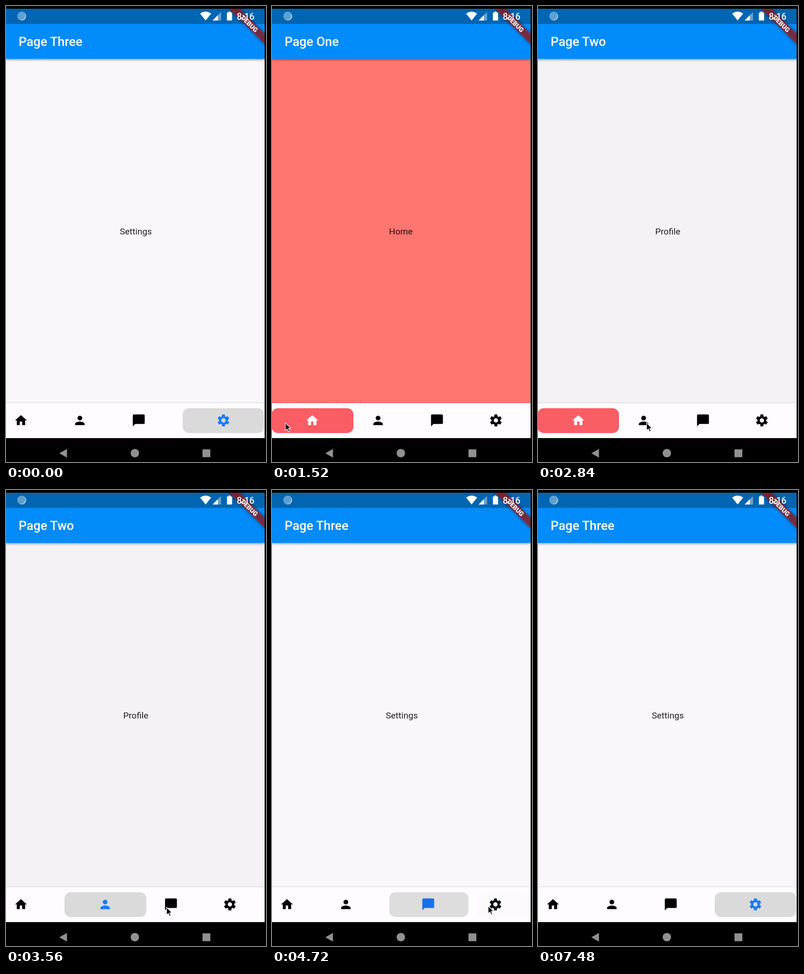
Recreate the animation shown at these times as an HTML page. Size 565x992 px, loop 7520 ms.

```html
<!DOCTYPE html>
<html lang="en">
<head>
<meta charset="utf-8">
<title>Bottom navigation</title>
<style>
  @property --p { syntax: '<number>'; inherits: true; initial-value: 0; }

  html, body { margin: 0; width: 100%; height: 100%; overflow: hidden; background: #000; }
  .stage { position: relative; width: 565px; height: 992px; overflow: hidden; background: #000;
    font-family: Roboto, sans-serif; }
  .layer { position: absolute; inset: 0; width: 565px; height: 992px; }
  .screen { position: absolute; left: 0; top: 6px; width: 562px; height: 934px; overflow: hidden; }

  /* pages */
  .page { position: absolute; inset: 0; background: var(--bg); visibility: hidden;
    animation: 7520ms step-end infinite; }
  .page svg { position: absolute; inset: 0; width: 562px; height: 934px; }
  .appbar { position: absolute; left: 0; top: 33px; width: 562px; height: 76px;
    background: #028bfa; box-shadow: 0 2px 5px rgba(0, 0, 0, .42); }
  .status { position: absolute; left: 0; top: 0; width: 562px; height: 33px; background: #0265b1; }
  .title { font-size: 27.3px; font-weight: 500; fill: #fff; }
  .label { font-size: 19.1px; fill: #000; fill-opacity: .87; text-anchor: middle; }
  .home { --bg: #ff7570; animation-name: show-home; }
  .profile { --bg: #f4f2f5; animation-name: show-profile; }
  .message { --bg: #929093; animation-name: show-message; }
  .settings { --bg: #f9f7fa; animation-name: show-settings; }

  @keyframes show-home {
    0%, 37.23%, 100% { visibility: hidden; }
    11.7% { visibility: visible; }
  }
  @keyframes show-profile {
    0%, 48.94%, 100% { visibility: hidden; }
    37.23% { visibility: visible; }
  }
  @keyframes show-message {
    0%, 60.11%, 100% { visibility: hidden; }
    48.94% { visibility: visible; }
  }
  @keyframes show-settings {
    0%, 60.11%, 100% { visibility: visible; }
    11.7% { visibility: hidden; }
  }

  /* tabs: --p runs from 0 (idle) to 1 (selected) */
  .tabs { position: absolute; left: 0; top: 858px; width: 562px; height: 76px;
    background: #fefcfe; box-shadow: 0 -1px 3px rgba(0, 0, 0, .13); }
  .row { position: absolute; left: -1px; top: 11px; display: flex; gap: 20px; }
  .tab { --r: 26; --g: 123; --b: 255; --pill: #dadada; position: relative; flex: none; height: 54px;
    width: calc(108.2px + 69.3px * var(--p));
    color: rgb(calc(var(--r) * var(--p)), calc(var(--g) * var(--p)), calc(var(--b) * var(--p)));
    animation: 7520ms cubic-bezier(.55, .055, .675, .19) infinite; }
  .tab::before { content: ''; position: absolute; inset: 0; border-radius: 14px;
    background: var(--pill); opacity: var(--p); }
  .tab svg { position: absolute; width: 31px; height: 31px; fill: currentColor;
    left: calc(18.1px + 55.15px * var(--p)); top: calc(11.4px - .8px * var(--p)); }
  .t-home { --r: 255; --g: 255; --b: 255; --pill: #fa5d64; animation-name: pick-home; }
  .t-profile { animation-name: pick-profile; }
  .t-message { animation-name: pick-message; }
  .t-settings { animation-name: pick-settings; }

  @keyframes pick-home {
    0%, 11.7%, 43.88%, 100% { --p: 0; }
    18.35%, 37.23% { --p: 1; }
  }
  @keyframes pick-profile {
    0%, 37.23%, 55.59%, 100% { --p: 0; }
    43.88%, 48.94% { --p: 1; }
  }
  @keyframes pick-message {
    0%, 48.94%, 66.76%, 100% { --p: 0; }
    55.59%, 60.11% { --p: 1; }
  }
  @keyframes pick-settings {
    0%, 11.7%, 66.76%, 100% { --p: 1; }
    18.35%, 60.11% { --p: 0; }
  }

  /* pointer */
  .cursor { animation: move 7520ms ease-in-out infinite; }
  @keyframes move {
    0%, 4.5% { transform: translate(120px, 996px); }
    7% { transform: translate(52px, 930px); }
    9.3% { transform: translate(16px, 910px); }
    11%, 24% { transform: translate(29px, 907px); }
    34.5%, 38% { transform: translate(236px, 907px); }
    46%, 49.4% { transform: translate(349px, 908px); }
    57%, 62% { transform: translate(474px, 904px); animation-timing-function: ease-in; }
    69% { transform: translate(270px, 943px); animation-timing-function: ease-out; }
    75%, 77% { transform: translate(37px, 911px); }
    80%, 100% { transform: translate(90px, 996px); }
  }
</style>
</head>
<body>
<div class="stage">
  <svg width="0" height="0" style="position:absolute">
    <symbol id="i-home" viewBox="0 0 24 24"><path d="M10 20v-6h4v6h5v-8h3L12 3 2 12h3v8z"/></symbol>
    <symbol id="i-person" viewBox="0 0 24 24">
      <circle cx="12" cy="8" r="4"/>
      <path d="M12 14c-2.67 0-8 1.34-8 4v2h16v-2c0-2.66-5.33-4-8-4z"/>
    </symbol>
    <symbol id="i-chat" viewBox="0 0 24 24">
      <path d="M20 2H4a2 2 0 0 0-2 2v18l4-4h14a2 2 0 0 0 2-2V4a2 2 0 0 0-2-2z"/>
    </symbol>
    <symbol id="i-gear" viewBox="0 0 24 24">
      <circle cx="12" cy="12" r="5.5" fill="none" stroke="currentColor" stroke-width="3.8"/>
      <path id="tooth" d="M9.2 6.2L9.6 2.4Q9.7 2 10.1 2H13.9Q14.3 2 14.4 2.4L14.8 6.2z"/>
      <use href="#tooth" transform="rotate(60 12 12)"/>
      <use href="#tooth" transform="rotate(120 12 12)"/>
      <use href="#tooth" transform="rotate(180 12 12)"/>
      <use href="#tooth" transform="rotate(240 12 12)"/>
      <use href="#tooth" transform="rotate(300 12 12)"/>
    </symbol>
  </svg>

  <div class="screen">
    <div class="page home"><div class="appbar"></div>
      <svg><text class="title" x="27.5" y="81">Page One</text><text class="label" x="280" y="490.5">Home</text></svg></div>
    <div class="page profile"><div class="appbar"></div>
      <svg><text class="title" x="27.5" y="81">Page Two</text><text class="label" x="282" y="490.5">Profile</text></svg></div>
    <div class="page message"><div class="appbar"></div>
      <svg><text class="title" x="27.5" y="81">Page Three</text><text class="label" x="282" y="490.5">Message</text></svg></div>
    <div class="page settings"><div class="appbar"></div>
      <svg><text class="title" x="27.5" y="81">Page Three</text><text class="label" x="282" y="490.5">Settings</text></svg></div>
    <div class="status"></div>

    <div class="tabs"><div class="row">
      <div class="tab t-home"><svg><use href="#i-home"/></svg></div>
      <div class="tab t-profile"><svg><use href="#i-person"/></svg></div>
      <div class="tab t-message"><svg><use href="#i-chat"/></svg></div>
      <div class="tab t-settings"><svg><use href="#i-gear"/></svg></div>
    </div></div>
  </div>

  <svg class="layer" viewBox="0 0 565 992">
    <clipPath id="clip"><path d="M0 6H562V940H0z"/></clipPath>
    <filter id="soft" x="-20%" y="-60%" width="140%" height="220%"><feGaussianBlur stdDeviation="3.5"/></filter>

    <!-- corner ribbon -->
    <g clip-path="url(#clip)">
      <g transform="translate(562 6) rotate(45)">
        <rect x="-54.6" y="38.2" width="109.2" height="16.4" opacity=".5" filter="url(#soft)"/>
        <rect x="-54.6" y="38.2" width="109.2" height="16.4" fill="#b71c1c" fill-opacity=".63"/>
        <text x="0" y="51.4" font-size="13.9" font-weight="900" fill="#fff" text-anchor="middle">DEBUG</text>
      </g>
    </g>

    <!-- status icons -->
    <circle cx="34.3" cy="22" r="8.4" fill="#5f9fce"/>
    <circle cx="34.3" cy="22" r="8.8" fill="none" stroke="#a9cfe9" stroke-width="1.6" stroke-dasharray="1.4 1.1"/>
    <path d="M41 16.2A9 9 0 0 1 31 30.4A9.6 9.6 0 0 0 41 16.2z" fill="#e4f1fa"/>
    <g fill="#fff">
      <path d="M433.8 31.6L421.8 16.6Q433.8 8 445.8 16.6z"/>
      <path d="M449 31.6H467.4V13z" opacity=".4"/>
      <path d="M449 31.6H460.4V20.1z"/>
      <path d="M480 14.2H483.3V12H488V14.2H491.3V31.6H480z"/>
      <text x="501.5" y="29.6" font-size="19.4" font-weight="500">8:16</text>
    </g>

    <!-- system buttons -->
    <g fill="#919191">
      <path d="M116 973L132.5 963.5V982.5z"/>
      <circle cx="280" cy="972.8" r="9.2"/>
      <rect x="427" y="964.5" width="17" height="17" rx="1"/>
    </g>

    <path class="cursor" d="M0 0V16.4L3.8 12.9 6.5 19 9.2 17.8 6.6 11.9H11.8z"
      fill="#000" stroke="#fff" stroke-width="1.2"/>
  </svg>
</div>
</body>
</html>
```
